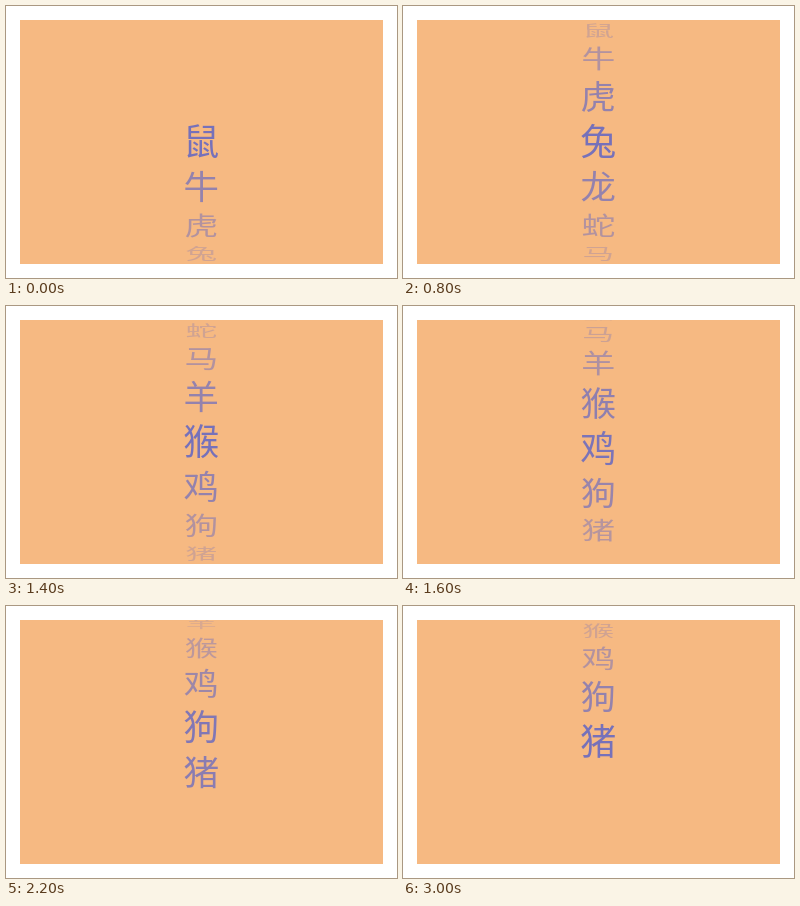
An HTML page with a canvas for the animation above (3.8 s loop, 391 by 272 pixels).

```html
<!DOCTYPE html>
<html lang="zh-CN">
<head>
<meta charset="utf-8">
<title>Picker wheel</title>
<style>
html, body { margin: 0; width: 100%; height: 100%; overflow: hidden; background: #fff; }
canvas { display: block; }
</style>
</head>
<body>
<canvas id="stage" width="391" height="272"></canvas>
<script>
const ctx = document.getElementById('stage').getContext('2d');
const signs = [...'鼠牛虎兔龙蛇马羊猴鸡狗猪'];
const LOOP = 3800, TICK = 100, REST = 4;
const CX = 195.3, CY = 135.7, RADIUS = 125, STEP = 21 * Math.PI / 180;

// Wheel position over time: [tick, position, speed]
const keys = [
  [0, 0, 0.3], [4, 3, 0.95], [10, 8, 0.52], [14, 9.47, 0.28],
  [18, 10.33, 0.16], [22, 10.78, 0.075], [24, 10.91, 0.055], [26, 11, 0.03]
];

function position(tick) {
  if (tick <= 0) return 0;
  if (tick >= 26) return 11;
  const i = keys.findIndex(k => k[0] > tick);
  const [t0, p0, v0] = keys[i - 1], [t1, p1, v1] = keys[i];
  const d = t1 - t0, u = (tick - t0) / d, w = 1 - u;
  return w * w * ((1 + 2 * u) * p0 + u * d * v0)
       + u * u * ((3 - 2 * u) * p1 - w * d * v1);
}

function drawSign(sign, angle) {
  const cos = Math.cos(angle);
  const depth = 1 / (1 + 0.25 * (1 - cos));
  ctx.save();
  ctx.translate(CX, CY + RADIUS * Math.sin(angle));
  ctx.scale(depth, depth * cos);
  ctx.globalAlpha = 1 - Math.abs(angle) / (Math.PI / 2);
  ctx.fillText(sign, 0, 13.7);
  ctx.restore();
}

function draw(time) {
  const pos = position(Math.floor(time / TICK) - REST);
  ctx.fillStyle = '#fff';
  ctx.fillRect(0, 0, 391, 272);
  ctx.save();
  ctx.beginPath();
  ctx.rect(14, 14, 363, 244);
  ctx.clip();
  ctx.fillStyle = '#f6b982';
  ctx.fillRect(14, 14, 363, 244);
  ctx.fillStyle = '#7671ba';
  ctx.font = '36px "Noto Sans CJK SC", "Noto Sans CJK", sans-serif';
  ctx.textAlign = 'center';
  ctx.textBaseline = 'alphabetic';
  signs.forEach((sign, i) => {
    const angle = (i - pos) * STEP;
    if (Math.abs(angle) < Math.PI / 2) drawSign(sign, angle);
  });
  ctx.restore();
}

const start = performance.now();
function frame() {
  draw((performance.now() - start) % LOOP);
  requestAnimationFrame(frame);
}
frame();
</script>
</body>
</html>
```
